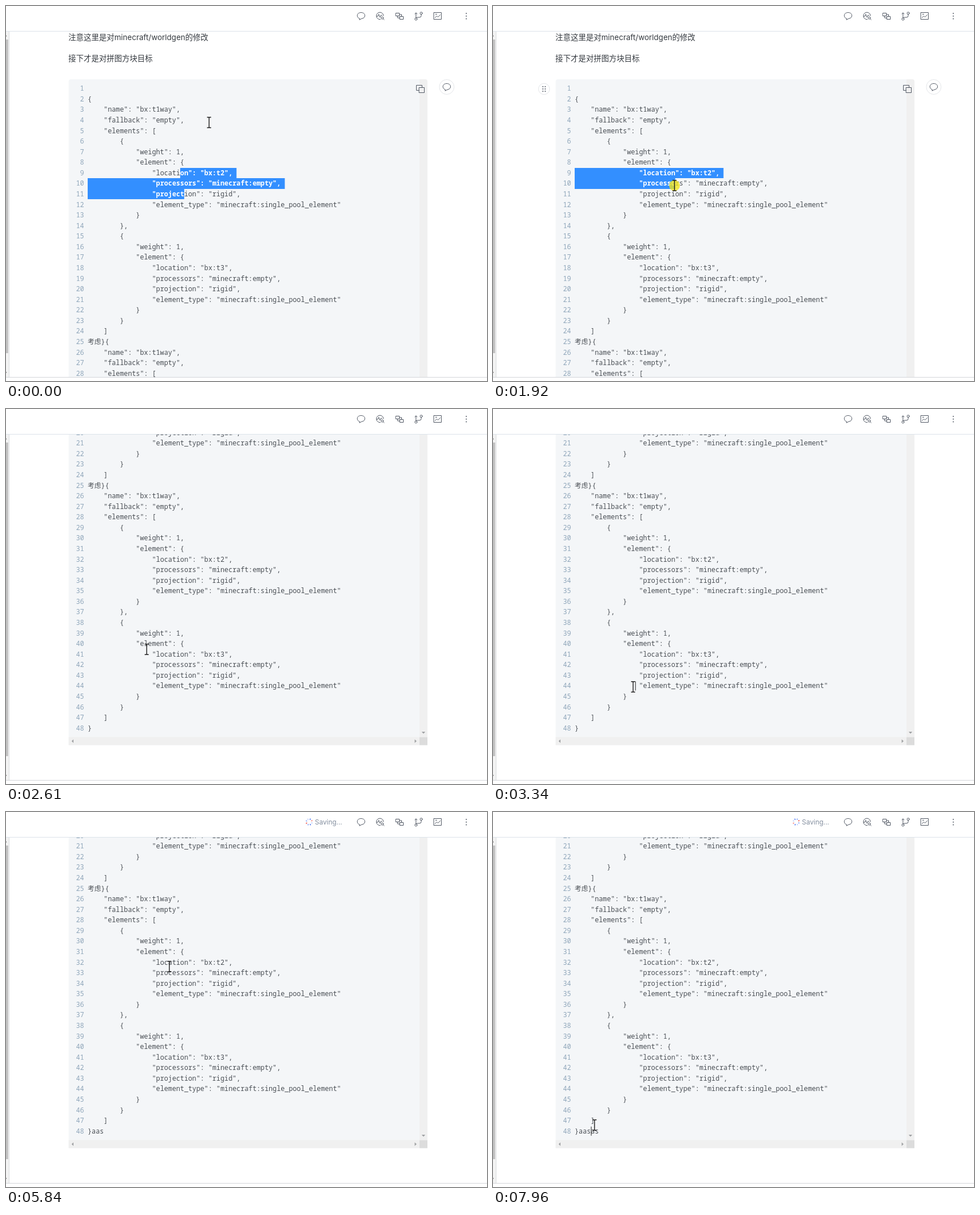
An HTML page that plays this animation: 848x660 px, repeating every 8000 ms.

```html
<!DOCTYPE html>
<html lang="zh">
<head>
<meta charset="utf-8">
<title>Code block editing</title>
<style>
  html, body { margin: 0; width: 100%; height: 100%; overflow: hidden; background: #fff; }
  svg { display: block; }
  .code { font: 11.82px "Noto Sans Mono", "Noto Sans CJK SC", "Noto Sans CJK", monospace; fill: #4a4f55; white-space: pre; }
  .num { fill: #8fa6ba; text-anchor: end; }
  .picked .code { fill: #fff; font-weight: 600; }
  .prose { font: 13.5px Inter, "Noto Sans CJK SC", "Noto Sans CJK", sans-serif; fill: #363b41; }
  .icon { fill: none; stroke: #505763; stroke-linejoin: round; stroke-linecap: round; }
  .dots { stroke: #505763; stroke-width: 2; stroke-linecap: round; }
  .ring { fill: #fff; stroke: #e4e6e9; }
</style>
</head>
<body>
<svg width="848" height="660" viewBox="0 0 848 660">
  <defs>
    <clipPath id="view"><rect y="45" width="848" height="608"/></clipPath>
    <clipPath id="pick"></clipPath>
    <path id="bubble" d="M-3 4.4C-5.2 3.6-6.7 1.8-6.7-.6-6.7-3.9-3.8-6 0-6S6.7-3.9 6.7-.6C6.7 2.3 4.2 4.5.8 4.8L-2.6 6.6Z"/>
  </defs>
  <rect width="848" height="660" fill="#fff"/>
  <g clip-path="url(#view)">
    <g id="page">
      <text class="prose" x="110" y="60">注意这里是对minecraft/worldgen的修改</text>
      <text class="prose" x="110" y="97">接下才是对拼图方块目标</text>
      <path d="M110.5 1048V133q0-4 4-4H739q4 0 4 4V1048Z" fill="#f4f6f8"/>
      <path d="M729 129H739q4 0 4 4V1034H729ZM110.5 1034H729V1048H110.5Z" fill="#f0f0f0"/>
      <rect x="729" y="1034" width="14" height="14" fill="#dcdcdc"/>
      <path d="M732.8 1024.5h6.4l-3.2 3.4ZM119 1037.8v6.4l-3.4-3.2ZM720.5 1037.8v6.4l3.4-3.2Z" fill="#a0a2a4"/>
      <path class="icon" d="M728 148.5H723.5V139.5H733.5V143.500M728.500 143.500h9v9h-9Z"/>
      <circle class="ring" cx="777" cy="142.5" r="13"/>
      <use href="#bubble" class="icon" x="777" y="142.5"/>
      <g id="handle">
        <circle class="ring" cx="90" cy="146" r="9.8"/>
        <path class="dots" d="M88 142v.01M92 142v.01M88 146v.01M92 146v.01M88 150v.01M92 150v.01"/>
      </g>
      <g id="nums"></g>
      <g id="lines"></g>
      <g class="picked" clip-path="url(#pick)">
        <rect x="144" y="136" width="585" height="900" fill="#338fff"/>
        <g id="white"></g>
      </g>
      <rect id="caret" width="1" height="16" fill="#222"/>
    </g>
  </g>

  <path d="M0 44.5H848" stroke="#dce3ea"/>
  <rect y="45" width="5" height="608" fill="#f3f3f3"/>
  <rect y="59" width="3.8" height="552" fill="#c1c1c1"/>
  <path d="M0 51l1.5 2.5H0ZM0 646.5l1.5-2.5H0Z" fill="#777"/>
  <path d="M5.5 45V653" stroke="#d9dbdd"/>
  <path d="M0 653.5H848" stroke="#d3d5da"/>

  <g class="icon">
    <use href="#bubble" x="626" y="17.5"/>
    <path d="M665.6 17A6.3 6.3 0 1 0 660 23.7M653.4 18h2.3l1.5-3.5 2.2 5.5 1.6-3.6h2"/>
    <circle cx="663.3" cy="21" r="2"/><path d="M664.8 22.5l1.7 1.8"/>
    <path d="M687.5 12.5h6v5h-6ZM694.5 18.5h6v5h-6ZM690.5 17.5V21h4M693.5 15h4v3.500"/>
    <circle cx="732" cy="12.7" r="2"/><circle cx="722.800" cy="23" r="2"/>
    <path d="M722.8 21V12M720.8 14l2-2 2 2M732 14.7V17q0 3-3 3h-3q-3 0-3.2 1.500"/>
    <rect x="754.5" y="11.5" width="13" height="12"/>
    <path d="M756.5 20.5l3-3 2.2 2 3.8-4M757.5 14.5h2"/>
  </g>
  <path class="dots" d="M811.5 13v.01M811.5 17.7v.01M811.5 22.4v.01"/>
  <g id="saving">
    <g id="spin"></g>
    <text x="544.5" y="22" font-family="Inter, sans-serif" font-size="11.9" fill="#8590a0">Saving...</text>
  </g>

  <g id="mouse">
    <circle id="press" r="9.5" fill="#efe61a" opacity=".78"/>
    <path d="M-3.500-9.300H-1L0-8.500 1-9.300H3.500M0-8.500V8.500M-3.500 9.300H-1L0 8.500 1 9.300H3.500" fill="none" stroke="#1a1a1a" stroke-width="1.4"/>
  </g>
</svg>
<script>
const LOOP = 8000, LEFT = 144, TOP = 136, ROW = 18.57, COL = 7.092;
const $ = id => document.getElementById(id);
const make = (parent, tag, attrs, text = "") => {
  const el = document.createElementNS("http://www.w3.org/2000/svg", tag);
  for (const k in attrs) el.setAttribute(k, attrs[k]);
  el.textContent = text;
  return parent.appendChild(el);
};
const show = (id, on) => $(id).setAttribute("visibility", on ? "visible" : "hidden");
const clamp = p => Math.min(1, Math.max(0, p));
const colX = c => LEFT + c * COL;
const rowY = n => TOP + (n - 1) * ROW;

// Document text
const pad = (n, s) => " ".repeat(n * 4) + s;
const piece = (place, end) => [
  pad(2, "{"),
  pad(3, '"weight": 1,'),
  pad(3, '"element": {'),
  pad(4, `"location": "bx:${place}",`),
  pad(4, '"processors": "minecraft:empty",'),
  pad(4, '"projection": "rigid",'),
  pad(4, '"element_type": "minecraft:single_pool_element"'),
  pad(3, "}"),
  pad(2, end)
];
const pool = [
  pad(1, '"name": "bx:t1way",'),
  pad(1, '"fallback": "empty",'),
  pad(1, '"elements": ['),
  ...piece("t2", "},"),
  ...piece("t3", "}"),
  pad(1, "]")
];
const doc = ["", "{", ...pool, "考虑}{", ...pool, "}"];

function writeLines(group) {
  return doc.map((s, i) => {
    const body = s.trimStart();
    return make(group, "text", { class: "code", x: colX(s.length - body.length), y: rowY(i + 1) + 13.3 }, body);
  });
}
doc.forEach((s, i) => make($("nums"), "text", { class: "code num", x: 137.6, y: rowY(i + 1) + 13.3 }, i + 1));
const lastLine = writeLines($("lines")).pop();
writeLines($("white"));

for (let i = 0; i < 8; i++)
  make($("spin"), "path", {
    d: "M0-6.300V-4", stroke: i % 4 ? "#5a82f5" : "#f0645c", "stroke-width": 1.8,
    opacity: 1 - i % 3 * .3, transform: `rotate(${i * 45})`
  });

// Pointer moves: leave, arrive, x, y
const home = [358, 205];
const moves = [
  [110, 410, 310, 442],
  [510, 910, 320, 316],
  [2110, 2410, 271, 438],
  [2510, 2910, 123, 341],
  [2910, 3210, 247, 489],
  [3940, 4740, 363, 498],
  [5010, 6010, 279, 246],
  [6410, 6710, 270, 408],
  [7210, 7510, 174, 562],
  [7710, 7910, 179, 551]
];
const clicks = [1920, 3240, 6290, 6720, 7540];
const keyTimes = [4240, 5140, 5340, 7060, 7260];
const PRESS = 90, BLINK = 400, EDIT = 3300;

const toTick = t => Math.max(0, Math.floor((t - 10) / 100) * 100 + 10);
const lastBefore = (list, t) => list.filter(k => k <= t).pop() ?? -LOOP;
const smooth = p => p * p * (3 - 2 * p);
const scrollAt = t => 456.4 * (1 - (1 - clamp((toTick(t) - 2110) / 400)) ** 1.65);

function mouseAt(t) {
  let [x, y] = home;
  for (const [leave, arrive, toX, toY] of moves) {
    const p = smooth(clamp((toTick(t) - leave) / (arrive - leave)));
    x += (toX - x) * p;
    y += (toY - y) * p;
  }
  return [Math.round(x), Math.round(y)];
}

// Selection as [line, column] ends
function selectionAt(t) {
  if (t < 410) return [[9, 23], [11, 24]];
  if (t >= 910 && t < 2010) return [[9, 0], [10, 25]];
}

function drawSelection(range) {
  $("pick").replaceChildren();
  if (!range) return;
  const [[first, from], [last, to]] = range;
  for (let n = first; n <= last; n++) {
    const a = n === first ? from : 0;
    const b = n === last ? to : doc[n - 1].length + 1;
    const y = Math.round(rowY(n));
    make($("pick"), "rect", { x: colX(a), y, width: (b - a) * COL, height: Math.round(rowY(n + 1)) - y });
  }
}

// The caret lands where the pointer was released and hides on typing
function drawCaret(t) {
  const click = lastBefore(clicks, t - PRESS);
  const on = t > EDIT && lastBefore(keyTimes, t) < click && Math.floor((t - click - PRESS) / BLINK) % 2 === 0;
  show("caret", on);
  if (!on) return;
  const [x, y] = mouseAt(click);
  const line = Math.floor((y + scrollAt(click) - TOP) / ROW) + 1;
  $("caret").setAttribute("x", colX(Math.round((x - LEFT) / COL)) + .3);
  $("caret").setAttribute("y", rowY(line) + 1.3);
}

function draw(t) {
  $("page").setAttribute("transform", `translate(0 ${-scrollAt(t)})`);
  show("handle", t >= 310);
  drawSelection(selectionAt(t));
  drawCaret(t);
  lastLine.textContent = "}" + "aasas".slice(0, keyTimes.filter(k => k <= t).length);
  show("saving", t >= keyTimes[0] + 100);
  $("spin").setAttribute("transform", `translate(534.5 17.5) rotate(${toTick(t) % 600 * .6})`);
  $("mouse").setAttribute("transform", `translate(${mouseAt(t)})`);
  show("press", t - lastBefore(clicks, t) < PRESS);
}

const start = performance.now();
function frame() {
  draw((performance.now() - start) % LOOP);
  requestAnimationFrame(frame);
}
frame();
</script>
</body>
</html>
```
